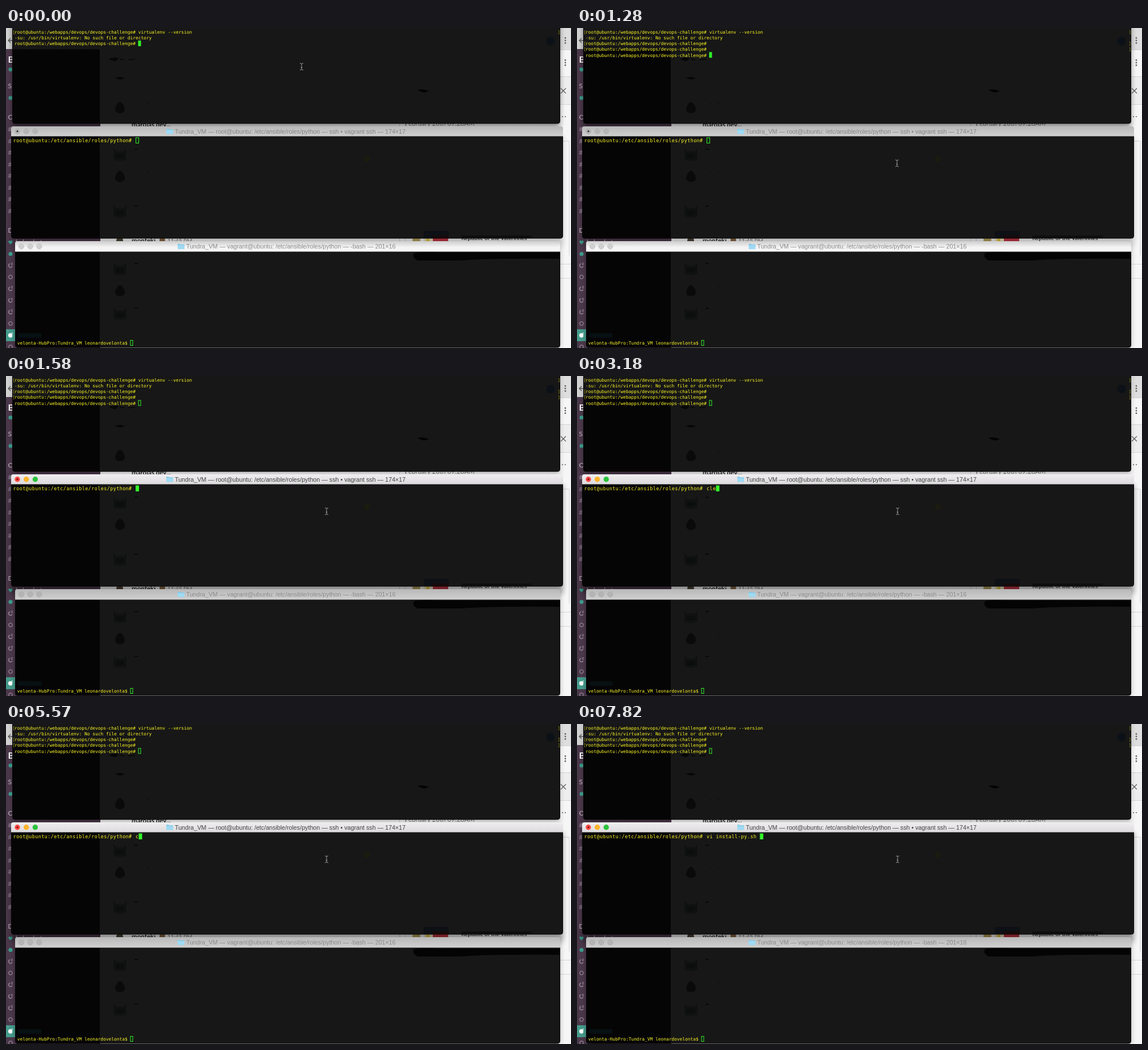
Write an HTML page that moves like this. It is 994 by 563 pixels and loops after 8 s.

```html
<!DOCTYPE html>
<html lang="en">
<head>
<meta charset="utf-8">
<title>Terminal session</title>
<style>
html, body { margin: 0; width: 100%; height: 100%; overflow: hidden; background: #f4f4f4; }
svg { display: block; width: 100%; height: 100%; }
text { white-space: pre; }
.mono { font: 7.865px "DejaVu Sans Mono", monospace; fill: #fbf723; }
.wide { font-size: 8.4px; letter-spacing: .453px; }
.ui { font-family: "Liberation Sans", Arial, sans-serif; }
.side { font-family: Lato, sans-serif; }
</style>
</head>
<body>
<svg id="stage" viewBox="0 0 994 563" preserveAspectRatio="none"></svg>
<script>
const LOOP = 8000;
const stage = document.getElementById('stage');

function add(tag, attrs, parent = stage, text) {
  const el = document.createElementNS('http://www.w3.org/2000/svg', tag);
  set(el, attrs);
  if (text !== undefined) el.textContent = text;
  return parent.appendChild(el);
}
function set(el, attrs) {
  for (const k in attrs) el.setAttribute(k, attrs[k]);
}
const rect = (x, y, width, height, fill, more) => add('rect', { x, y, width, height, fill, ...more });
const circle = (cx, cy, r, fill, more) => add('circle', { cx, cy, r, fill, ...more });
const path = (d, fill, more) => add('path', { d, fill, ...more });
const label = (x, y, text, cls, more) => add('text', { x, y, class: cls, ...more }, stage, text);

// Latest entry whose start time has passed
const at = (steps, t) => steps.reduce((found, s) => (t >= s[0] ? s : found), steps[0]);

const defs = add('defs', {});
function gradient(id, top, bottom, end = 1) {
  const g = add('linearGradient', { id, x1: 0, y1: 0, x2: 0, y2: 1 }, defs);
  add('stop', { offset: 0, 'stop-color': top }, g);
  add('stop', { offset: end, 'stop-color': bottom }, g);
}
gradient('active', '#f0eef0', '#dcdadc');
gradient('dim', '#b8b8b8', '#d0d0d0');
gradient('hazy', '#cdcdcd', '#f5f5f5', .6);
const blur = add('filter', { id: 'blur', x: '-10%', y: '-20%', width: '120%', height: '140%' }, defs);
add('feGaussianBlur', { stdDeviation: 5 }, blur);

function presence(y, away, color) {
  if (!away) return circle(8, y, 3.3, 'none', { stroke: color, 'stroke-width': 1 });
  path(`M7.500 ${y - 3}A3.300 3.300 0 1 0 11 ${y + 1.5}`, 'none', { stroke: color, 'stroke-width': 1.1 });
  label(9, y - .5, 'z', 'side', { fill: color, 'font-size': 6.5, 'font-weight': 700 });
}

function drawSidebar() {
  rect(0, 0, 166, 563, '#4b384a');
  rect(0, 0, 166, 37, '#d2d2d2');
  path('M11 22H4M8 18L4 22L8 26', 'none', { stroke: '#555', 'stroke-width': 1.3 });
  const letter = (y, text, size, more) =>
    label(3.5, y, text, 'side', { fill: '#c5bbc4', 'font-size': size, ...more });
  letter(60.5, 'B', 16, { 'font-weight': 700, fill: '#fff' });
  letter(106, 'S', 12);
  letter(161, 'C', 12);
  letter(360, 'D', 12);
  for (let i = 0; i < 8; i++) letter(182 + i * 20.5, '#', 12, { fill: '#96899a' });
  for (const y of [73, 123, 397.5]) circle(8, y, 3.5, '#3b9c8c');
  path('M8 381L4.5 377A2 2 0 0 1 8 375A2 2 0 0 1 11.5 377Z', '#3b9c8c');
  rect(0, 530, 166, 21, '#459b8b');
  for (let i = 0; i < 8; i++) {
    const y = 417.5 + i * 20.5;
    if (i === 6) circle(7.5, y, 3.5, '#fff');
    presence(y, ![1, 5, 7].includes(i), i === 6 ? '#fff' : '#a99eaa');
  }
  label(17, 381, 'helperbot', 'side', { fill: '#cfc5ce', 'font-size': 11 });
}

function drawPage() {
  rect(166, 0, 828, 563, '#f6f6f6');
  rect(966, 0, 28, 38, '#dedede');
  rect(966, 85, 28, 50, '#eeeeee');
  for (const y of [38, 85, 134, 415, 440]) rect(970, y, 24, 1, '#d5d5d5');
  for (const y of [22, 61]) for (const d of [-4.5, 0, 4.5]) circle(984, y + d, 1.4, '#666');
  path('M976 106L985 115M985 106L976 115', 'none', { stroke: '#555', 'stroke-width': 1.1 });
  circle(979, 156, 1.1, '#666');
  circle(984, 156, 1.1, '#666');
  path('M980 199H991V400', 'none', { stroke: '#d0d0d0' });
  rect(692, 168, 1, 210, '#ccc');
  rect(702, 168, 1, 210, '#ccc');
  label(221, 174, 'marolas dev...', 'side', { 'font-size': 11.5, 'font-weight': 700, fill: '#222' });
  label(702, 171.5, 'February 26th 09:28AM', 'side', { 'font-size': 11.5, fill: '#777' });
  circle(200, 374, 6, '#4c4236');
  label(221, 377.5, 'monteki', 'side', { 'font-size': 11.5, 'font-weight': 700, fill: '#222' });
  circle(275, 373, 5, '#8a6742');
  label(284, 377.5, '11:45 PM', 'side', { 'font-size': 10, fill: '#777' });
  circle(722, 373, 7, '#b5a05a');
  rect(735, 370, 16, 6, '#eee4bd');
  circle(742, 373, 3, '#e2c43c');
  rect(751, 370, 27, 6, '#c23543');
  label(801, 373, 'Republic of the Valerinnes', 'side', { 'font-size': 10, 'font-weight': 700, fill: '#333' });
}

function shadow(x, y, w, h, opacity) {
  return rect(x, y, w, h, '#000', { rx: 6, opacity, filter: 'url(#blur)' });
}

function body(x, y, right, bottom) {
  const r = 4;
  path(`M${x} ${y}H${right}V${bottom - r}Q${right} ${bottom} ${right - r} ${bottom}H${x + r}Q${x} ${bottom} ${x} ${bottom - r}Z`,
    '#171717', { stroke: '#050505', 'stroke-width': 1 });
  path(`M${x} ${y}H165V${bottom}H${x + r}Q${x} ${bottom} ${x} ${bottom - r}Z`, '#060506');
}

// Dim avatars showing through the terminal
function ghost(y, face) {
  if (face) {
    path(`M189 ${y - 10}L194 ${y - 5}H207L212 ${y - 10}V${y + 9}Q200 ${y + 14} 189 ${y + 9}Z`, '#101111');
    path(`M193 ${y - 1}H208V${y + 5}Q200 ${y + 9} 193 ${y + 5}Z`, '#0c0d0d');
    path(`M226 ${y - 8}q3 -2 6 0`, 'none', { stroke: '#060606', 'stroke-width': 1.6 });
  } else {
    path(`M200.500 ${y - 10}C205 ${y - 9} 209 ${y - 1} 209 ${y + 3}C209 ${y + 12} 192 ${y + 12} 192 ${y + 3}C192 ${y - 1} 196 ${y - 9} 200.500 ${y - 10}Z`, '#0a0a0a');
    rect(234, y - 8, 3, 1, '#0d0d0d');
    rect(248, y - 8, 4, 1, '#0d0d0d');
  }
}

function titleBar(x, y, right, bottom, text, textX, mid) {
  const r = 4;
  const bar = path(`M${x} ${bottom}V${y + r}Q${x} ${y} ${x + r} ${y}H${right - r}Q${right} ${y} ${right} ${y + r}V${bottom}Z`, '#f5f5f5');
  path(`M${textX - 15} ${mid - 4.5}h4l1 1h7v8h-12z`, '#86cbe9');
  rect(textX - 15, mid - 2, 12, 6.5, '#9fdaf3', { rx: .5 });
  const title = label(textX, mid + 3.8, text, 'ui', { 'font-size': 10.7, fill: '#777' });
  const lights = [0, 1, 2].map(i => circle(x + 11 + i * 15.7, mid, 4.7, '#ddd', { 'stroke-width': .6 }));
  return { bar, title, lights };
}

function caret(x, y, w, h) {
  const el = rect(x, y, w, h, 'none', { stroke: '#32f02a' });
  return (solid, nx = x, ny = y) => set(el, {
    x: nx + .5, y: ny + .5, width: w - 1, height: h - 1,
    fill: solid ? '#32f928' : 'none'
  });
}

drawPage();
drawSidebar();

// Upper window
const upperShade = shadow(11, -10, 964, 186, .4);
body(11.5, -5, 974.5, 168);
rect(12, 0, 153, 37.5, '#171717');
ghost(140, false);
path('M183 55q8 -4 14 -1l-5 4zM200 55l8 1M215 56l12 -1', '#070707', { stroke: '#070707', 'stroke-width': 1.4 });
path('M192 88q8 -4 17 0q-8 5 -17 0z', '#080808');
path('M724 109q8 -3 20 2q-8 4 -14 1z', '#040404');
circle(958, 23, 7.5, '#0b1117');
const PROMPT = 'root@ubuntu:/webapps/devops/devops-challenge#';
const lineY = i => 9.7 + i * 10.2;
const upperLines = [PROMPT + ' virtualenv --version', '-su: /usr/bin/virtualenv: No such file or directory', PROMPT, PROMPT, PROMPT]
  .map((text, i) => label(15, lineY(i), text, 'mono'));
const brackets = [0, 2, 3].map(row => {
  const g = add('g', { class: 'mono', opacity: .6 });
  add('text', { x: 11.5, y: lineY(row) }, g, '[');
  add('text', { x: 970.5, y: lineY(row) }, g, ']');
  return { row, g };
});
const upperCaret = caret(232.5, 22, 5, 10);

// Lower window
shadow(16, 380, 959, 184, .25);
body(16.5, 393, 974.5, 562);
path('M718 396Q730 393 760 395H975V406Q850 405 800 409H724Q713 403 718 396Z', '#040404');
ghost(423, true);
ghost(462, false);
ghost(502, true);
rect(21, 537, 42, 8, '#071013', { rx: 4 });
const lowShade = shadow(9, 190, 971, 194, .2);
const low = titleBar(16, 375, 975, 393.500, 'Tundra_VM — vagrant@ubuntu: /etc/ansible/roles/python — -bash — 201×16', 317, 384.2);
label(19.7, 557.3, 'velonta-HubPro:Tundra_VM leonardovelonta$', 'mono');
caret(218.5, 549, 5, 10)(false);

// Middle window
body(9.5, 190.500, 979.5, 370);
ghost(222, true);
ghost(261, false);
ghost(322, true);
circle(635, 230, 5.5, '#1b1b10');
rect(735, 357, 44, 13, '#0d1015', { rx: 3 });
rect(750, 365, 29, 5, '#170a0b');
rect(801, 365, 124, 5, '#0e0e0e', { rx: 2 });
const mid = titleBar(9, 173, 980, 190.500, 'Tundra_VM — root@ubuntu: /etc/ansible/roles/python — ssh • vagrant ssh — 174×17', 297, 181.7);
const closeDot = circle(20, 181.700, 1.6, '#333');
const CELL = 5.51, INPUT_X = 228;
label(12.8, 201.2, 'root@ubuntu:/etc/ansible/roles/python#', 'mono wide');
const input = label(INPUT_X, 201.2, '', 'mono wide');
const midCaret = caret(INPUT_X, 192.500, 6, 10.5);

const pointer = path('M-3 -6Q0 -6 0 -4Q0 -6 3 -6M0 -4V4M-3 6Q0 6 0 4Q0 6 3 6M-1.500 1.500H1.500', 'none', { stroke: '#a6a6a6', 'stroke-width': .9 });

const typing = [
  [0, ''], [2260, 'clear'], [3030, 'clea'], [3180, 'cle'], [3330, 'cl'], [3480, 'c'], [3770, ''],
  [4670, 'ca'], [4970, 'cat'], [5270, 'ca'], [5570, 'c'], [5720, ''],
  [6320, 'vi install-py.sh '], [6620, 'vi install-py.yml '], [6920, 'vi install-py.sh '],
  [7220, 'vi install-py.'], [7820, 'vi install-py.sh ']
];
const entered = [[0, 0], [150, 1], [570, 2]];
const moves = [
  [0, 520, 68], [570, 525, 95], [750, 538, 152], [930, 552, 206],
  [1110, 561, 232], [1280, 563, 238], [1430, 564, 238]
];
const BAR_CLEAN = 1430, FOCUS = 1580;

function render(t) {
  const focused = t >= FOCUS;
  const extra = at(entered, t)[1];
  upperLines.forEach((el, i) => set(el, { visibility: i <= 2 + extra ? 'visible' : 'hidden' }));
  brackets.forEach(b => set(b.g, { visibility: b.row < 2 + extra ? 'visible' : 'hidden' }));
  upperCaret(!focused, 232.5, 22 + extra * 10.2);
  set(upperShade, { opacity: focused ? .18 : .4 });

  const clean = t >= BAR_CLEAN;
  set(mid.bar, { fill: focused ? 'url(#active)' : clean ? '#f6f6f6' : 'url(#dim)' });
  set(mid.title, { fill: focused ? '#444' : '#858585' });
  mid.lights.forEach((el, i) => set(el, {
    fill: focused ? ['#fc4b48', '#fdb32b', '#2ac33b'][i] : clean ? '#ddd' : '#b5b5b5',
    stroke: focused ? 'none' : '#aaa'
  }));
  set(closeDot, { fill: focused ? '#8c1010' : '#333' });

  set(low.bar, { fill: focused ? 'url(#dim)' : 'url(#hazy)' });
  set(low.title, { fill: '#8a8a8a' });
  low.lights.forEach(el => set(el, { fill: focused ? '#b4b4b4' : '#d0d0d0', stroke: focused ? '#a5a5a5' : '#bbb' }));
  set(lowShade, { opacity: focused ? .38 : .2 });

  const text = at(typing, t)[1];
  input.textContent = text;
  midCaret(focused, INPUT_X + text.length * CELL);

  const [, x, y] = at(moves, t);
  set(pointer, { transform: `translate(${x} ${y})` });
}

function tick(now) {
  render(now % LOOP);
  requestAnimationFrame(tick);
}
render(0);
requestAnimationFrame(tick);
</script>
</body>
</html>
```
